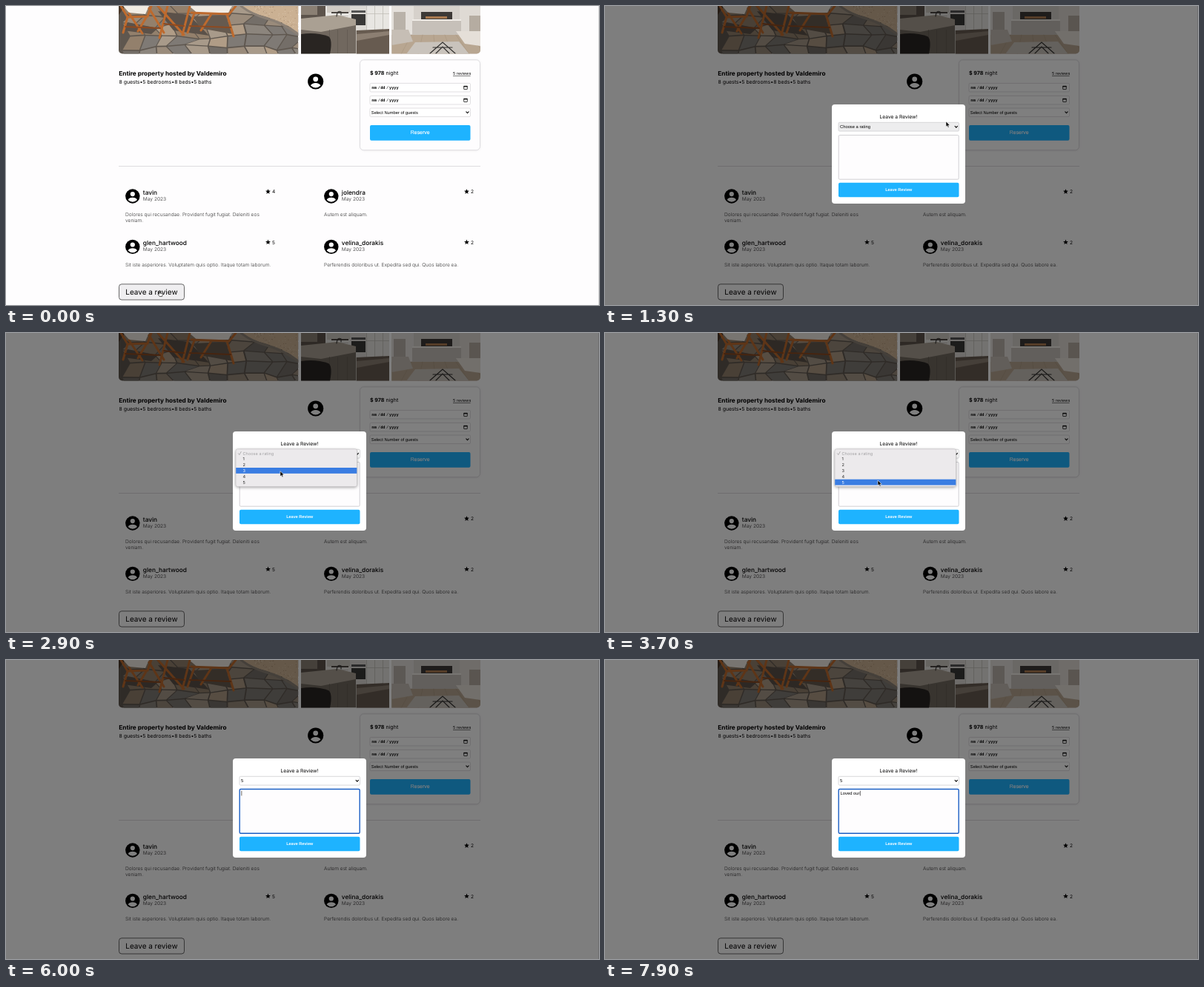
Recreate the animation shown at these times as an HTML page. Size 800 by 404 pixels, loop 8000 ms.

```html
<!DOCTYPE html>
<html lang="en">
<head>
<meta charset="utf-8">
<title>Leave a review</title>
<style>
  html, body { margin: 0; width: 100%; height: 100%; overflow: hidden; background: #fefdfe; }
  svg { display: block; width: 800px; height: 404px; }
  text { font-family: Inter, "Open Sans", sans-serif; white-space: pre; text-rendering: geometricPrecision; }
  .ui { font-family: "Liberation Sans", Arial, sans-serif; }
  .mono { font-family: "Liberation Mono", "DejaVu Sans Mono", monospace; }
</style>
</head>
<body>
<svg id="stage" viewBox="0 0 800 404"></svg>
<script>
const LOOP = 8000, STEP = 100;
const BLUE = '#1eb3ff';

// Markup helpers
const attrs = o => Object.entries(o).map(([k, v]) => ` ${k}="${v}"`).join('');
const rect = (x, y, w, h, fill, more = {}) =>
  `<rect x="${x}" y="${y}" width="${w}" height="${h}" fill="${fill}"${attrs(more)}/>`;
const poly = (points, fill) => `<polygon points="${points}" fill="${fill}"/>`;
const line = (d, stroke, width = 1) =>
  `<path d="${d}" fill="none" stroke="${stroke}" stroke-width="${width}" stroke-linecap="round"/>`;
const text = (x, y, size, str, more = {}) =>
  `<text x="${x}" y="${y}" font-size="${size}"${attrs(more)}>${str}</text>`;
const group = (body, more = {}) => `<g${attrs(more)}>${body}</g>`;

let seed = 7;
const rnd = () => (seed = (seed * 16807) % 2147483647) / 2147483647;
const pick = list => list[Math.floor(rnd() * list.length)];

function patio() {
  let s = rect(152, 0, 242, 65, '#5f574f');
  const cols = 11, rows = 5, grid = [];
  for (let r = 0; r <= rows; r++)
    for (let c = 0; c <= cols; c++)
      grid.push([144 + c * 24 + (r % 2) * 10 + rnd() * 14, r * 15 - 8 + rnd() * 9]);
  const tones = ['#8c857d', '#a89a8a', '#9a8b7b', '#7f7a75', '#b09c86', '#746e68', '#93806c'];
  for (let r = 0; r < rows; r++)
    for (let c = 0; c < cols; c++) {
      const i = r * (cols + 1) + c;
      const ring = [grid[i], grid[i + 1], grid[i + cols + 2], grid[i + cols + 1]];
      const mx = ring.reduce((a, p) => a + p[0], 0) / 4;
      const my = ring.reduce((a, p) => a + p[1], 0) / 4;
      s += poly(ring.map(([x, y]) => [mx + (x - mx) * .93, my + (y - my) * .9]).join(' '), pick(tones));
    }
  s += '<path d="M318 0Q329 9 352 15T394 36V0Z" fill="#cbb193"/>';
  s += line('M317 0Q331 11 352 17T394 38', '#8b8075', 3);
  for (let i = 0; i < 90; i++) {
    const x = 335 + rnd() * 59, y = rnd() * Math.min(32, (x - 325) * .5);
    s += rect(x, y, 1, .8, pick(['#a58a70', '#ddc9b0']));
  }
  // Chair shadows, cushions and legs
  s += poly('152,0 161,0 152,12', '#4b392b') + poly('164,22 205,30 196,38 158,33', '#5b5149')
    + poly('205,7 247,12 274,40 226,33', '#5b5149') + poly('252,14 296,12 306,38 262,30', '#665a4f');
  s += poly('158,0 193,0 188,11 166,9', '#f1ece4') + poly('247,0 305,0 300,9 260,11', '#f1ebe3');
  const wood = '#bd6a2e';
  s += line('M155 0L164 15L191 14L196 0M164 15L158 36M166 10L184 37M190 14L178 34M193 3L213 36', wood, 3);
  s += line('M218 0L207 43M205 0L240 39M248 0L238 39M250 9L301 11L310 0M254 10L245 36M298 11L307 41M277 11L263 33', wood, 3);
  s += line('M161 28L208 30M213 24L240 27M248 27L303 29', '#8e491f', 1.8);
  return s;
}

function kitchen() {
  let s = rect(398, 0, 119, 65, '#b8b3ac');
  s += rect(398, 0, 33, 20, '#5c534b') + rect(431, 0, 86, 33, '#e8e6e2');
  s += rect(398, 0, 22, 12, '#8b8074') + rect(433, 0, 31, 9, '#d0cbc4');
  s += rect(439, 8, 23, 2, '#4c4742') + rect(464, 0, 22, 33, '#dddad5') + rect(466, 11, 19, 15, '#393837') + rect(466, 6, 19, 3, '#555');
  for (const x of [486, 497, 508]) s += rect(x, 0, .7, 33, '#b9b6b0');
  s += rect(486, 10, 31, .7, '#bebab4') + rect(436, 13, 26, .7, '#bcb7b0');
  s += poly('473,33 517,31 517,65 473,65', '#675b50') + poly('473,38 517,34 517,39 473,47', '#8c7f72');
  s += poly('398,17 447,12 472,18 472,27 425,36 398,33', '#aaa093') + poly('398,32 425,35 472,26 472,64 398,64', '#71685f');
  for (const x of [436, 447, 460]) s += rect(x, 32, .6, 32, '#5d554e');
  s += line('M446 14Q447 5 452 8V12', '#383634', 1.2);
  s += '<path d="M398 38Q418 35 435 41Q441 45 437 65H398Z" fill="#292522"/>';
  return s;
}

function lounge() {
  let s = rect(520, 0, 120, 65, '#d9d4cf');
  s += rect(520, 0, 30, 38, '#e4e0db') + rect(550, 0, 62, 40, '#d6d1cb') + rect(612, 0, 28, 39, '#dfdad4');
  s += rect(523, 8, 16, 25, '#b9b2a9') + rect(625, 13, 15, 26, '#b5aca1');
  s += rect(560, 8, 42, 10, '#3d3936') + rect(566, 14, 29, 3, '#a9794f');
  s += rect(548, 18, 66, 22, '#c6c0b9') + rect(548, 18, 66, 2, '#efebe6');
  s += poly('520,39 640,39 640,65 520,65', '#b8a691');
  for (let i = 0; i < 7; i++) s += line(`M${532 + i * 15} 39L${510 + i * 23} 65`, '#a79580', .6);
  s += poly('520,32 543,32 549,48 520,53', '#c6beb5') + poly('607,34 640,34 640,54 619,51', '#e5dfd8');
  s += poly('552,49 611,48 625,65 540,65', '#c9c3bc');
  s += line('M572 64L589 49L606 64M580 64L589 55L598 64M576 56L602 56', '#32302e', 1.2);
  return s;
}

const avatar = (x, y, r) => group(
  `<circle r="10" fill="#000"/><circle cy="-3" r="3.2" fill="#fff"/>
   <path d="M-6.3 5.2C-5 .8 5 .8 6.3 5.2Q0 11 -6.3 5.2Z" fill="#fff"/>`,
  { transform: `translate(${x} ${y}) scale(${r / 10})` });

const star = (x, y) => poly(Array.from({ length: 10 }, (_, i) => {
  const r = i % 2 ? 1.6 : 3.6, a = i * Math.PI / 5;
  return [(x + r * Math.sin(a)).toFixed(2), (y - r * Math.cos(a)).toFixed(2)];
}).join(' '), '#000');

const chevron = (x, y) => line(`M${x - 1.7} ${y - .9}L${x} ${y + .9}L${x + 1.7} ${y - .9}`, '#111', 1.1);

function dateField(y) {
  return rect(491, y, 135.5, 11.6, '#fff', { rx: 1.5, stroke: '#d4d3d6', 'stroke-width': .7 })
    + text(493.5, y + 7.8, 5.3, 'mm', { class: 'mono', 'font-weight': 700 })
    + text(501.7, y + 7.8, 5.3, '/', { class: 'mono' })
    + text(505.2, y + 7.8, 5.3, 'dd', { class: 'mono', 'font-weight': 700 })
    + text(513, y + 7.8, 5.3, '/', { class: 'mono' })
    + text(517, y + 7.8, 5.3, 'yyyy', { class: 'mono', 'font-weight': 700 })
    + rect(617.7, y + 4, 4.6, 4.2, 'none', { stroke: '#111', 'stroke-width': .8, rx: .4 })
    + rect(617.4, y + 3.5, 5.2, 1.5, '#111');
}

function review(x, y, name, score, lines) {
  return avatar(x + 9.8, y, 9.7)
    + text(x + 23.8, y - 2, 8.3, name, { 'font-weight': 500 })
    + text(x + 23.8, y + 5.6, 6.6, 'May 2023', { fill: '#555' })
    + star(x + 192.5, y - 6.2)
    + text(x + 198, y - 3.8, 6.6, score)
    + lines.map((s, i) => text(x, y + 27 + i * 8, 6.65, s, { fill: '#333', 'font-weight': 300 })).join('');
}

const page = `
  <clipPath id="photos"><rect x="152" y="-20" width="488" height="84.5" rx="5"/></clipPath>
  <clipPath id="p1"><rect x="152" width="242.3" height="65"/></clipPath>
  <clipPath id="p2"><rect x="398" width="119" height="65"/></clipPath>
  <clipPath id="p3"><rect x="520.3" width="120" height="65"/></clipPath>
  <filter id="soft" x="-20%" y="-20%" width="140%" height="150%"><feGaussianBlur stdDeviation="2"/></filter>`
  + rect(0, 0, 800, 404, '#fefdfe') + rect(799, 0, 1, 404, '#dcdbdd')
  + group(group(patio(), { 'clip-path': 'url(#p1)' }) + group(kitchen(), { 'clip-path': 'url(#p2)' })
    + group(lounge(), { 'clip-path': 'url(#p3)' }), { 'clip-path': 'url(#photos)' })
  + text(152.3, 93.5, 8.25, 'Entire property hosted by Valdemiro', { 'font-weight': 700 })
  + text(152.5, 105.2, 6.9, '8 guests•5 bedrooms•8 beds•5 baths')
  + avatar(417.7, 102, 10.6)
  + rect(478, 73, 161.5, 122, '#000', { rx: 5, opacity: .07, filter: 'url(#soft)' })
  + rect(477.5, 72.8, 162, 122, '#fefdfe', { rx: 5, stroke: '#d6d5d9', 'stroke-width': .8 })
  + text(491, 93, 7.1, '<tspan font-weight="700">$ 978</tspan> night')
  + text(603, 93, 5.4, '5 reviews') + rect(603, 94, 23.6, .5, '#000')
  + dateField(104.4) + dateField(121.4)
  + rect(491, 138, 135.5, 11.6, '#fff', { rx: 1.5, stroke: '#d4d3d6', 'stroke-width': .7 })
  + text(492.8, 145.8, 5.75, 'Select Number of guests', { class: 'ui' }) + chevron(622.5, 143.7)
  + rect(491, 161, 135.5, 20.8, BLUE, { rx: 2 })
  + text(558.7, 173.4, 6.9, 'Reserve', { class: 'ui', fill: '#fff', 'text-anchor': 'middle', stroke: '#fff', 'stroke-width': .15 })
  + rect(152, 216.2, 488, .8, '#d6d5d8')
  + review(161, 257, 'tavin', 4, ['Dolores qui recusandae. Provident fugit fugiat. Deleniti eos', 'veniam.'])
  + review(429, 257, 'jolendra', 2, ['Autem est aliquam.'])
  + review(161, 325.4, 'glen_hartwood', 5, ['Sit iste asperiores. Voluptatem quis optio. Itaque totam laborum.'])
  + review(429, 325.4, 'velina_dorakis', 2, ['Perferendis doloribus ut. Expedita sed qui. Quos labore ea.'])
  + rect(152.5, 375.8, 88, 21.2, '#efeef0', { id: 'open', rx: 3.5, stroke: '#444', 'stroke-width': .8 })
  + text(161.3, 390, 9.95, 'Leave a review');

const OPTION_Y = 166.3, OPTION_H = 7.85;
const modal = rect(306, 133, 180, 134, '#fff', { rx: 4 })
  + text(396, 151.8, 6.7, 'Leave a Review!', { 'text-anchor': 'middle' })
  + rect(315, 157.3, 162.5, 11.8, '#fff', { id: 'select', rx: 1.5, stroke: '#cfced2', 'stroke-width': .8 })
  + text(317, 165.2, 5.8, '', { id: 'value', class: 'ui' }) + chevron(473.8, 163.2)
  + rect(315.2, 174.5, 162, 59.7, '#fefdfe', { id: 'area', rx: 1.5 })
  + text(317.6, 182.2, 5.8, '', { id: 'typed', class: 'ui' })
  + rect(0, 176.8, .6, 6.6, '#000', { id: 'caret' })
  + rect(315, 238.8, 162.5, 19.4, BLUE, { rx: 2 })
  + text(396.2, 250.4, 5.5, 'Leave Review', { class: 'ui', fill: '#fff', 'font-weight': 700, 'text-anchor': 'middle' })
  + group(
    rect(310, 158, 163.5, 50.5, '#000', { rx: 3, opacity: .4, filter: 'url(#soft)' })
    + rect(310, 156.8, 163.5, 50.8, '#eceaec', { rx: 2.5, stroke: '#bcbabd', 'stroke-width': .5 })
    + rect(310.2, 0, 163.1, OPTION_H, '#3a7de2', { id: 'mark' })
    + line('M313.4 162.7L314.8 164.6L317.2 160.4', '#a3a2a4', .8)
    + text(319.5, 164.8, 5.6, 'Choose a rating', { fill: '#a3a2a4' })
    + [1, 2, 3, 4, 5].map(n => text(319.5, OPTION_Y + n * OPTION_H - 1.8, 5.6, n, { class: 'option' })).join(''),
    { id: 'menu' });

const pointers = group('<path d="M0 0V7.2L1.7 5.7L2.8 8.3L4.1 7.7L3 5.2H5.3Z" fill="#000" stroke="#fff" stroke-width=".6"/>', { id: 'arrow' })
  + group('<path d="M0 .4Q.8-.3 1.2.5V3L4.2 3.6Q5 4 4.6 5.5L4 7.5H.7L-1.7 4.5Q-1.5 3.5-.4 4.2L0 4.5Z" fill="#fff" stroke="#000" stroke-width=".6"/>', { id: 'hand' })
  + group(line('M-1.2-3.3Q0-3.3 0-2.4Q0-3.3 1.2-3.3M0-2.4V2.4M-1.2 3.3Q0 3.3 0 2.4Q0 3.3 1.2 3.3', '#222', .6), { id: 'beam' });

const stage = document.getElementById('stage');
stage.innerHTML = page + rect(0, 0, 800, 404, '#000', { id: 'shade', opacity: .5 })
  + group(modal, { id: 'modal' }) + pointers;
const el = id => document.getElementById(id);
const options = [...document.querySelectorAll('.option')];

// Pointer path: time, x, y of the tip
const PATH = [
  [0, 206.5, 385], [200, 206.5, 384], [600, 255, 336], [900, 335, 250], [1300, 460, 156],
  [1700, 459, 159], [2000, 405, 172], [2300, 370, 186], [2800, 370, 186], [3300, 369, 192],
  [3700, 368, 199], [4400, 368, 200], [4900, 362, 205], [8000, 362, 205]
];
const SHOW = 100, OPEN = 1700, CHOOSE = 4500, FOCUS = 5200, HIDE = 5600;
const TYPED = 'Loved our', TYPE_FROM = 6500, TYPE_GAP = 170;

function pointerAt(t) {
  const i = Math.max(1, PATH.findIndex(p => p[0] > t));
  const [t0, x0, y0] = PATH[i - 1], [t1, x1, y1] = PATH[i];
  const k = (t - t0) / (t1 - t0), e = k * k * (3 - 2 * k);
  return [x0 + (x1 - x0) * e, y0 + (y1 - y0) * e];
}

const show = (id, on) => el(id).setAttribute('visibility', on ? 'visible' : 'hidden');

function draw(t) {
  const [x, y] = pointerAt(t);
  const shown = t >= SHOW, menu = t >= OPEN && t < CHOOSE, focus = t >= FOCUS;
  show('shade', shown);
  el('modal').style.display = shown ? '' : 'none';
  el('open').setAttribute('fill', shown ? '#fefdfe' : '#efeef0');

  const overSelect = !menu && x > 315 && x < 478 && y >= 155 && y < 169;
  el('select').setAttribute('fill', overSelect ? '#ededee' : '#fff');
  el('value').textContent = t >= CHOOSE ? '5' : 'Choose a rating';

  el('menu').style.display = menu ? '' : 'none';
  const row = Math.min(5, Math.floor((y - OPTION_Y) / OPTION_H) + 1);
  el('mark').style.display = row > 0 ? '' : 'none';
  el('mark').setAttribute('y', OPTION_Y + (row - 1) * OPTION_H);
  options.forEach((o, i) => o.setAttribute('fill', i + 1 === row ? '#fff' : '#222'));

  el('area').setAttribute('stroke', focus ? '#1b5fc4' : '#c6c5c9');
  el('area').setAttribute('stroke-width', focus ? 1.4 : .8);
  const count = Math.max(0, Math.min(TYPED.length, Math.floor((t - TYPE_FROM) / TYPE_GAP) + 1));
  const typed = el('typed');
  typed.textContent = TYPED.slice(0, count);
  const caretX = 317.6 + (count ? typed.getComputedTextLength() + .5 : 0);
  el('caret').setAttribute('x', caretX);
  el('caret').style.display = focus && (count || (t - FOCUS) % 1000 < 500 || t >= 6000) ? '' : 'none';

  const inArea = t >= CHOOSE && y > 174 && y < 234;
  const overButton = x > 315 && x < 478 && y > 239 && y < 258;
  const kind = t >= HIDE ? '' : !shown || overButton ? 'hand' : inArea ? 'beam' : 'arrow';
  for (const id of ['arrow', 'hand', 'beam']) {
    show(id, id === kind);
    el(id).setAttribute('transform', `translate(${x.toFixed(2)} ${y.toFixed(2)})`);
  }
}

const start = performance.now();
function tick() {
  const t = (performance.now() - start) % LOOP;
  draw(Math.floor(t / STEP) * STEP);
  requestAnimationFrame(tick);
}
tick();
</script>
</body>
</html>
```
